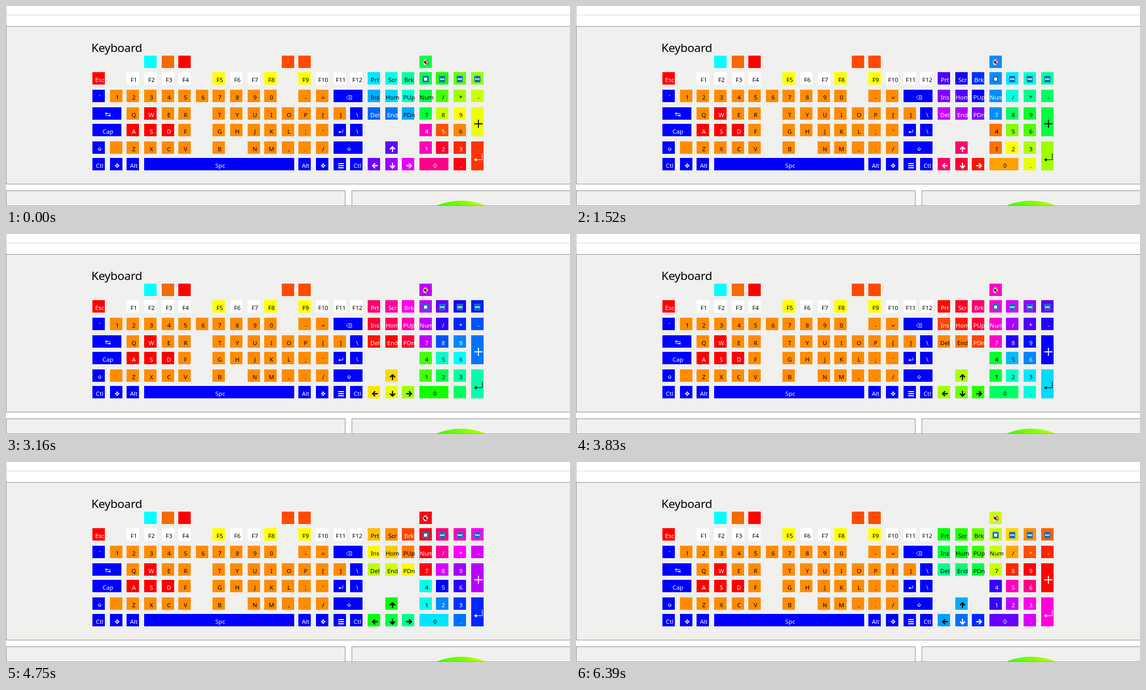
These frames come from a looping animation (1090x387 px, 6.57 s). An HTML page:

```html
<!DOCTYPE html>
<html lang="en">
<head>
<meta charset="utf-8">
<title>Keyboard lighting</title>
<style>
html, body { margin: 0; width: 1090px; height: 387px; overflow: hidden; background: #fff; }
svg { display: block; }
text { font: 11.6px "Noto Sans", "Open Sans", sans-serif; text-anchor: middle; }
text.title { font-size: 22.6px; letter-spacing: -.35px; text-anchor: start; }
</style>
</head>
<body>
<svg id="stage" width="1090" height="387" viewBox="0 0 1090 387">
  <defs>
    <linearGradient id="arc" gradientUnits="userSpaceOnUse" x1="830" y1="0" x2="930" y2="0">
      <stop offset="0" stop-color="#32ff00"/>
      <stop offset="1" stop-color="#c8ff00"/>
    </linearGradient>
  </defs>
  <path d="M0 17.5H1090" stroke="#d9d9d9"/>
  <path d="M.5 0V39" stroke="#c4c4c4"/>
  <g fill="#f0f0ee" stroke="#828790">
    <rect x=".5" y="39.5" width="1100" height="305"/>
    <rect x=".5" y="357.5" width="655" height="40"/>
    <rect x="668.5" y="357.5" width="430" height="40"/>
  </g>
  <circle cx="879.5" cy="504" r="127.3" fill="url(#arc)"/>
  <path d="M0 386.5H1090" stroke="#a0a0a4"/>
  <text class="title" x="165" y="89">Keyboard</text>
  <g id="keys"></g>
</svg>
<script>
const colX = [167, 201, 233, 267, 301, 333, 367, 399, 433, 467, 499, 533, 565, 599,
  633, 665, 699, 733, 765, 799, 831, 865, 899];
const rowY = [96, 128, 162, 196, 228, 262, 294];
const layer = document.getElementById('keys');
const wheel = [];

// Icons are drawn around the origin in the label colour.
const line = (d, w = 1) => `<path d="${d}" fill="none" stroke="currentColor" stroke-width="${w}"/>`;
const solid = d => `<path d="${d}" fill="currentColor"/>`;
const diamond = (x, y) => `M${x} ${y - 2}l2 2l-2 2l-2 -2z`;
const arrow = turn => `<g transform="rotate(${turn})">${line('M-4.5 0H5.5M.3 -4.8L-4.5 0L.3 4.8', 2.3)}</g>`;
const media = d => '<rect x="-6" y="-6" width="12" height="12" rx="1" fill="#0063b1"/>' +
  '<rect x="-5.5" y="-5.5" width="11" height="11" fill="none" stroke="#2f8ad8"/>' +
  `<path d="${d}" fill="#fff"/>`;
const icons = {
  tab: line('M-4.5 -4V0M-4 -2H5M4.5 0V4M-5 2H4') + solid('M-4.5 -2l3 -2v4zM4.5 2l-3 -2v4z'),
  shift: line('M0 -3.5L3.2 0H1.5V2.5H-1.5V0H-3.2z'),
  bksp: line('M-5 0L-2 -3.5H5V3.5H-2zM-.5 -1.7L3 1.7M3 -1.7L-.5 1.7', .9),
  enter: line('M4 -4V1H-3') + solid('M-4.5 1l3.5 -2.5v5z'),
  meta: solid(diamond(0, -2.5) + diamond(2.5, 0) + diamond(0, 2.5) + diamond(-2.5, 0)),
  menu: line('M-5 -4H6M-5 0H6M-5 4H6', 2),
  left: arrow(0), up: arrow(90), right: arrow(180), down: arrow(270),
  plus: line('M-8 0H8M0 -8V8', 1.8),
  bigEnter: line('M7.5 -8.5V3.5H-7', 1.1) + solid('M-8.5 3.5l5 -3.5v7z'),
  mute: '<circle r="5.4" fill="#f6eeee"/><path d="M-4 -1.5h2l3.5 -3v9l-3.5 -3h-2z" fill="#333"/>' +
    '<path d="M-3.9 -3.9L3.9 3.9M2 -4.5A5 5 0 0 1 2 4.5" fill="none" stroke="#d81424" stroke-width="1.3"/>',
  stop: media('M-3 -3h6v6h-6z'),
  prev: media('M-4 -2.5h1v5h-1zM-3 0l3.3 -2.5v5zM.5 0l3.5 -2.5v5z'),
  play: media('M-4 -2.5l3.3 2.5l-3.3 2.5zM-.7 -2.5l3.3 2.5l-3.3 2.5zM2.2 -2.5h.8v5h-.8zM3.6 -2.5h.8v5h-.8z'),
  next: media('M-4 -2.5l3.5 2.5l-3.5 2.5zM-.3 -2.5l3.3 2.5l-3.3 2.5zM3 -2.5h1v5h-1z')
};

const esc = s => s.replace('&', '&amp;').replace('<', '&lt;');

function addKey(col, row, label, { w = 24, h = 24, dx = 2, dy = 3 } = {}) {
  const x = colX[col], y = rowY[row];
  const g = document.createElementNS('http://www.w3.org/2000/svg', 'g');
  const cx = x + w / 2 + dx;
  const face = icons[label]
    ? `<g transform="translate(${cx} ${y + h / 2 + dy})">${icons[label]}</g>`
    : `<text x="${cx}" y="${y + 19}" fill="currentColor">${esc(label)}</text>`;
  g.innerHTML = `<rect x="${x}" y="${y}" width="${w}" height="${h}"/>${face}`;
  layer.append(g);
  return g;
}

function paint(g, rgb) {
  const luma = .2126 * rgb[0] + .7152 * rgb[1] + .0722 * rgb[2];
  g.firstChild.setAttribute('fill', `rgb(${rgb})`);
  g.style.color = luma > 127 ? '#000' : '#fff';
}

const red = [255, 0, 0], blue = [0, 0, 255], white = [255, 255, 255], yellow = [255, 255, 0];
const orange = [255, 140, 0], ember = [255, 75, 0];

function run(row, col, labels, rgb, opt) {
  labels.split(' ').forEach((s, i) => paint(addKey(col + i, row, s, opt), rgb));
}

run(0, 3, '', [0, 255, 255]);
run(0, 4, '', [242, 108, 0]);
run(0, 5, '', red);
run(0, 11, ' ', ember);

run(1, 0, 'Esc', red);
run(1, 2, 'F1 F2 F3 F4', white);
run(1, 7, 'F5', yellow);
run(1, 8, 'F6 F7', white);
run(1, 10, 'F8', yellow);
run(1, 12, 'F9', yellow);
run(1, 13, 'F10 F11 F12', white);

run(2, 0, '`', blue);
run(2, 1, '1 2 3 4 5 6 7 8 9 0', orange);
run(2, 12, '- =', orange);
run(2, 14, 'bksp', blue, { w: 56 });

run(3, 0, 'tab', blue, { w: 56, dy: 2 });
run(3, 2, 'Q', orange);
run(3, 3, 'W', red);
run(3, 4, 'E R', orange);
run(3, 7, 'T Y U I O P [ ]', orange);
run(3, 15, '\\', blue);

run(4, 0, 'Cap', blue, { w: 56 });
run(4, 2, 'A S D', red);
run(4, 5, 'F', orange);
run(4, 7, "G H J K L ; '", orange);
run(4, 14, 'enter \\', blue);

run(5, 0, 'shift', blue);
run(5, 1, ' Z X C V', orange);
run(5, 7, 'B', orange);
run(5, 9, 'N M , . /', orange);
run(5, 14, 'shift', blue, { w: 56 });

run(6, 0, 'Ctl meta Alt', blue);
run(6, 3, 'Spc', blue, { w: 290 });
run(6, 12, 'Alt meta menu Ctl', blue);

// Hue follows the angle around the hub, measured in grid cells.
const hub = { col: 19, row: 3.5 };

function spin(row, col, labels, opt = {}) {
  labels.split(' ').forEach((s, i) => {
    const dx = (opt.ledCol ?? col + i) - hub.col;
    const dy = (opt.ledRow ?? row) - hub.row;
    const base = 46 - Math.atan2(dy, dx) * 180 / Math.PI;
    wheel.push({ g: addKey(col + i, row, s, opt), base });
  });
}

spin(0, 19, 'mute', { dx: 0, dy: 1 });
spin(1, 16, 'Prt Scr Brk');
spin(1, 19, 'stop prev play next', { dx: 0, dy: 1.5 });
spin(2, 16, 'Ins Hom PUp Num / * -');
spin(3, 16, 'Del End PDn 7 8 9');
spin(3, 22, 'plus', { h: 56, dy: 4, ledRow: 2.5 });
spin(4, 19, '4 5 6');
spin(5, 17, 'up');
spin(5, 19, '1 2 3');
spin(5, 22, 'bigEnter', { h: 56, dy: 4, ledRow: 5.5 });
spin(6, 16, 'left down right');
spin(6, 19, '0', { w: 56, ledCol: 19.5 });
spin(6, 21, '.');

function hueRgb(hue) {
  const part = n => {
    const k = (((hue / 60 + n) % 6) + 6) % 6;
    return Math.round(255 * (1 - Math.max(0, Math.min(k, 4 - k, 1))));
  };
  return [part(5), part(3), part(1)];
}

const period = 6570, stepHue = 360 * 5 / 255;
const ticks = [130, 260, 400];
for (let j = 0; j < 13; j++) {
  const start = 600 + 460 * j + (j > 5 ? 10 : 0);
  ticks.push(start, start + 130, start + 260);
}

let shown = -1;
function draw(ms) {
  const t = ms % period;
  const step = ticks.filter(at => at <= t).length;
  if (step === shown) return;
  shown = step;
  for (const { g, base } of wheel) paint(g, hueRgb(base + step * stepHue));
}

draw(0);
const begin = performance.now();
function tick() {
  draw(performance.now() - begin);
  requestAnimationFrame(tick);
}
requestAnimationFrame(tick);
</script>
</body>
</html>
```
